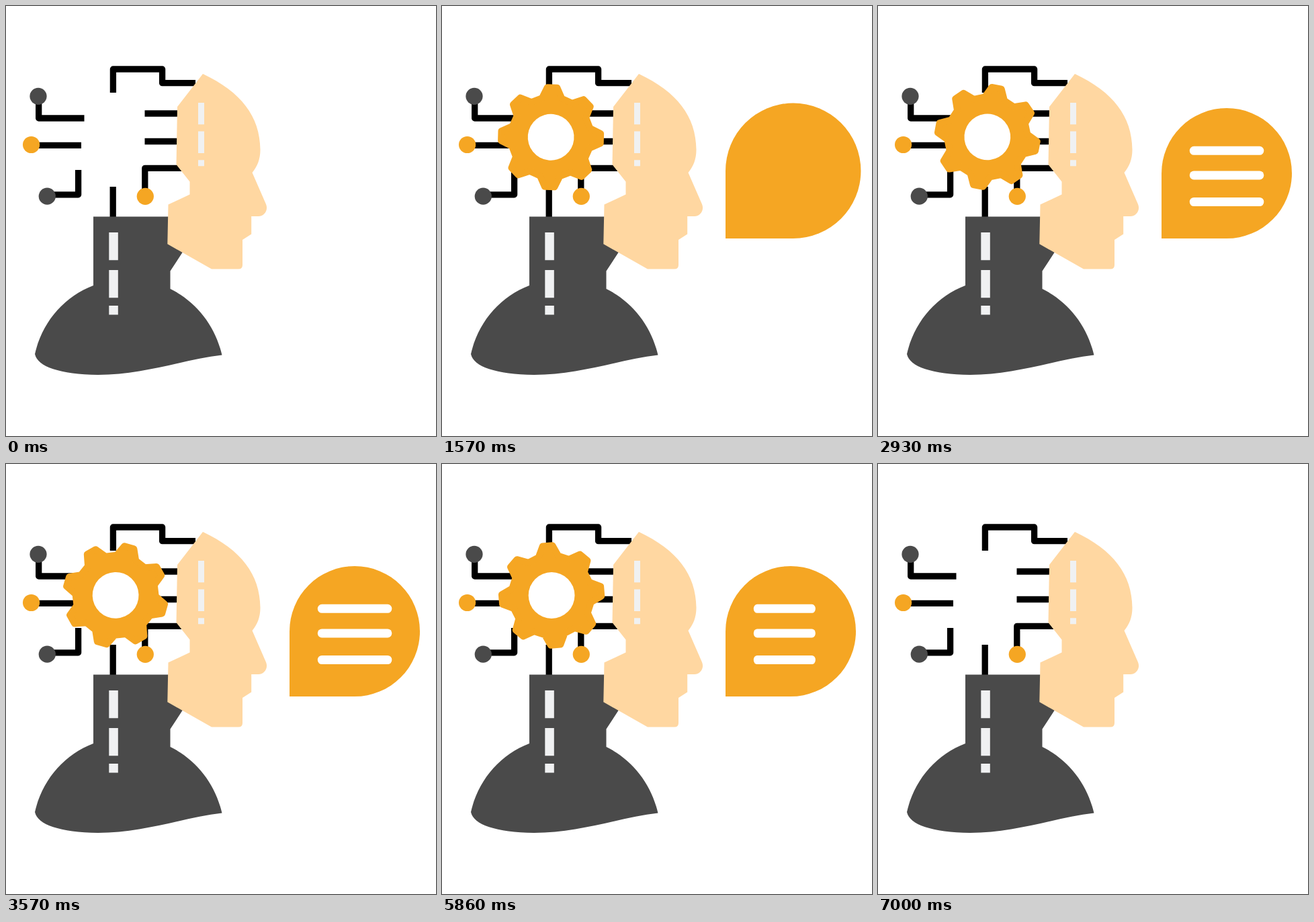
Recreate the animation shown at these times as an HTML page. Size 640x640 px, loop 7210 ms.

```html
<!DOCTYPE html>
<html lang="en">
<head>
<meta charset="utf-8">
<title>Thinking machine</title>
<style>
  html, body { margin: 0; width: 100%; height: 100%; overflow: hidden; background: #fff; }
  svg { display: block; width: 100%; height: 100%; }
</style>
</head>
<body>
<svg viewBox="0 0 640 640">
  <g fill="none" stroke="#000" stroke-width="9.3" stroke-linejoin="round">
    <path d="M159.4 129V94H232.6V114.7H282"/>
    <path d="M48.7 136V167H116.5M40 207.3H112M61 280.8H107.6V244"/>
    <path d="M159.2 269V318M206.5 160H260M206.5 201.5H260M206.8 283V241.3H266"/>
  </g>
  <g fill="#4a4a4a">
    <circle cx="48" cy="134.3" r="12.6"/>
    <circle cx="61.3" cy="283.2" r="12.6"/>
    <path d="M130 313.5H250L269 357L244.5 394.5V421C283 440 311 475 321.5 519.5C265 526 205 549 137 549C80 548 47 537 43 518C54 470 86 433 130 416Z"/>
  </g>
  <g fill="#f5a623">
    <circle cx="37.6" cy="206.5" r="12.6"/>
    <circle cx="207.3" cy="283.3" r="12.6"/>
  </g>
  <path fill="#ffd7a1" d="M293 101L255 150L253.5 236L273.5 261.5V280.5L241.5 295.5L240.3 354.3L306 391.5H346Q352 391.5 352 385.5V348L365.2 339.5V313H375.5C385 313 390.5 303.5 387 295L366.5 248C374 239 378.5 228 378.5 214C378 164 350 128 293 101Z"/>
  <path fill="#f0f1f2" d="M286 144h9v32.3h-9zM286 186.5h9v32.5h-9zM286 229.3h9v8.9h-9zM153.3 337h13.5v41.3h-13.5zM153.3 393h13.5v41.2h-13.5zM153.3 446h13.5v13.4h-13.5z"/>
  <g id="gear">
    <path id="cog" fill="#f5a623" stroke="#f5a623" stroke-width="10" stroke-linejoin="round"/>
    <circle r="34.4" fill="#fff"/>
  </g>
  <path id="bubble" fill="#f5a623" d="M0 0V-97A97 97 0 1 1 97 0Z"/>
  <g id="lines" fill="#fff">
    <rect y="208.8" width="110.5" height="13" rx="6.3"/>
    <rect y="245.4" width="110.5" height="13" rx="6.3"/>
    <rect y="285" width="110.5" height="13" rx="6.3"/>
  </g>
</svg>
<script>
const LOOP = 7210;
const el = id => document.getElementById(id);
const [gear, cog, bubble, lines] = ['gear', 'cog', 'bubble', 'lines'].map(el);

const span = (t, from, to) => Math.min(1, Math.max(0, (t - from) / (to - from)));
const outCubic = p => 1 - (1 - p) ** 3;
const inOutSine = p => (1 - Math.cos(Math.PI * p)) / 2;
const outBack = p => 1 + 2.52 * (p - 1) ** 3 + 1.52 * (p - 1) ** 2;

function cogPath(teeth) {
  const points = [];
  for (let i = 0; i < teeth; i++) {
    for (const [offset, r] of [[-14.4, 59.6], [-5.65, 74.2], [5.65, 74.2], [14.4, 59.6]]) {
      const a = (i * 360 / teeth + offset - 94.7) * Math.PI / 180;
      points.push((r * Math.cos(a)).toFixed(2) + ' ' + (r * Math.sin(a)).toFixed(2));
    }
  }
  return 'M' + points.join('L') + 'Z';
}
cog.setAttribute('d', cogPath(8));

function place(node, scale, transform) {
  node.setAttribute('visibility', scale > 0.004 ? 'visible' : 'hidden');
  node.setAttribute('transform', transform);
}

function draw(t) {
  const gearSize = outCubic(span(t, 0, 1060)) * (1 - outCubic(span(t, 6522, 7000)));
  const turn = 180 * (inOutSine(span(t, 0, 1060)) + inOutSine(span(t, 1200, 4320)));
  place(gear, gearSize,
    `translate(162.6 195.4) scale(${gearSize}) rotate(${turn}) translate(.5 .1)`);

  const bubbleSize = outBack(span(t, 870, 2440)) * (1 - outCubic(span(t, 6533, 7000)));
  place(bubble, bubbleSize, `translate(422 346) scale(${bubbleSize})`);

  const lineSize = outCubic(span(t, 1950, 2950)) * (1 - outCubic(span(t, 5802, 6800)));
  place(lines, lineSize, `translate(463.8 0) scale(${lineSize} 1)`);
}

const start = performance.now();
function tick() {
  draw((performance.now() - start) % LOOP);
  requestAnimationFrame(tick);
}
draw(0);
requestAnimationFrame(tick);
</script>
</body>
</html>
```
